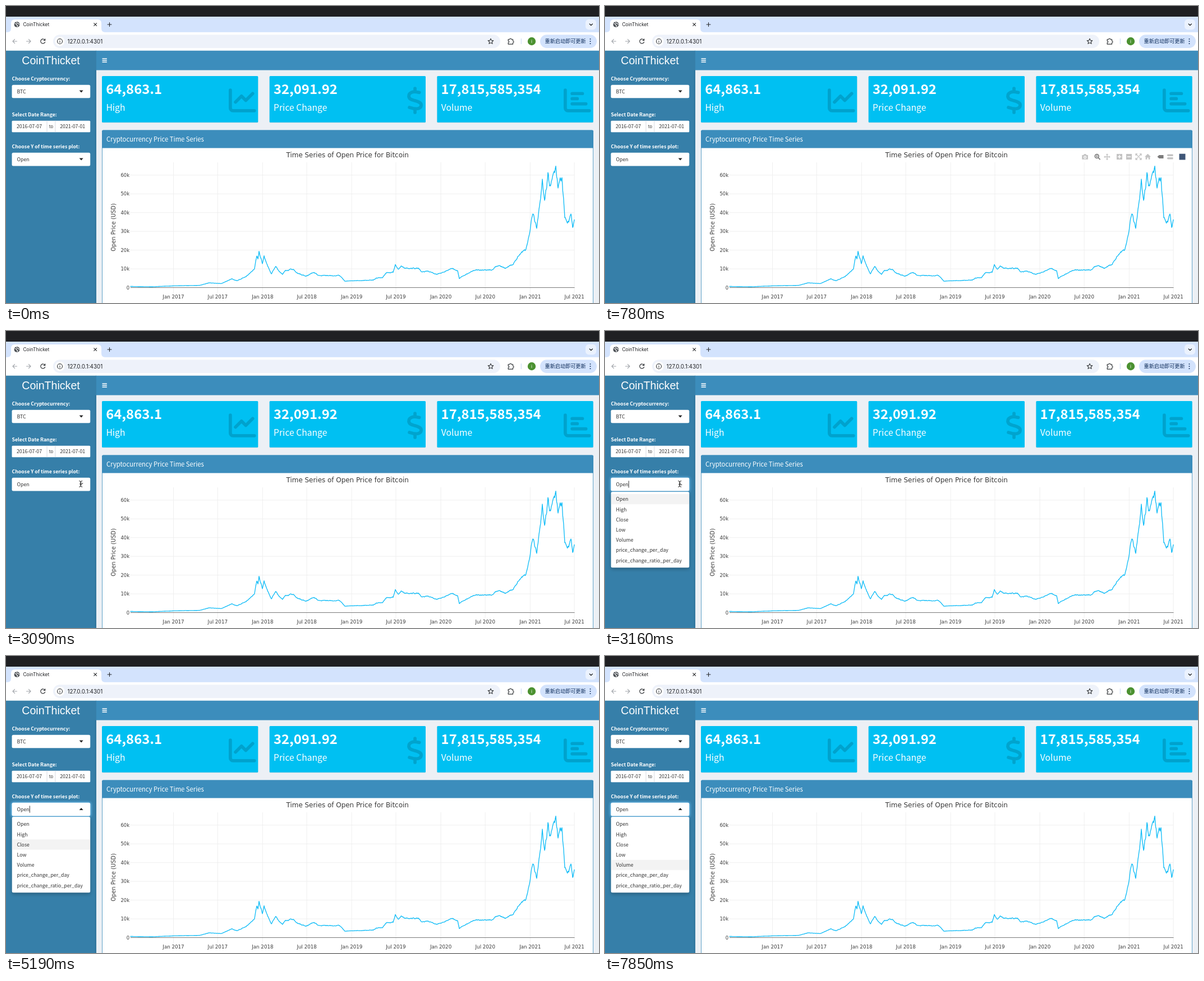
Recreate the animation shown at these times as an HTML page. Size 1057 by 530 pixels, loop 8000 ms.

```html
<!DOCTYPE html>
<html lang="en">
<head>
<meta charset="utf-8">
<title>CoinThicket</title>
<style>
html, body { margin: 0; width: 100%; height: 100%; overflow: hidden; background: #ecf0f5; }
svg { display: block; width: 1057px; height: 530px; }
text { white-space: pre; }
.page { font: 8.77px "Noto Sans CJK SC", "Noto Sans CJK", sans-serif; fill: #333; }
.chrome { font: 8.4px Inter, sans-serif; fill: #1f2023; }
.plot { font: 8.4px "DejaVu Sans", sans-serif; fill: #3a3a3a; }
.label { font-weight: 700; fill: #fff; }
.value { font-size: 23.85px; font-weight: 700; fill: #fff; }
.name { font-size: 15.67px; fill: #fff; }
.line { fill: none; stroke-linecap: round; stroke-linejoin: round; }

/* One loop is 8 s, so 1% is 80 ms. */
.anim { animation: 8s step-end infinite; }
#modebar { animation-name: modebar; }
#menu, #up { animation-name: open; }
#down { animation-name: closed; }
#glow { animation-name: glow; }
#beam { animation-name: beam; }
#caret { animation-name: caret; }
#pick { animation-name: pick; }
@keyframes modebar {
  0% { opacity: 0; } 6.25% { opacity: .1; } 7.125% { opacity: .4; } 8% { opacity: .7; }
  8.875% { opacity: .92; } 9.75% { opacity: 1; } 25.5% { opacity: .8; }
  26.375% { opacity: .4; } 27.25% { opacity: .12; } 28.125%, 100% { opacity: 0; }
}
@keyframes open { 0% { opacity: 0; } 39.5%, 100% { opacity: 1; } }
@keyframes closed { 0% { opacity: 1; } 39.5%, 100% { opacity: 0; } }
@keyframes glow { 0% { opacity: 0; } 39.5% { opacity: .8; } 40.375%, 100% { opacity: 1; } }
@keyframes beam { 0% { opacity: 0; } 38.625% { opacity: 1; } 43.875%, 100% { opacity: 0; } }
@keyframes caret {
  0% { opacity: 0; } 39.5% { opacity: 1; } 46.5% { opacity: 0; } 52.625% { opacity: 1; }
  58.75% { opacity: 0; } 64.875% { opacity: 1; } 71.875% { opacity: 0; } 78% { opacity: 1; }
  85% { opacity: 0; } 92% { opacity: 1; } 98.125%, 100% { opacity: 0; }
}
@keyframes pick {
  0% { transform: none; } 44.75% { transform: translateY(18.2px); }
  64.875% { transform: translateY(36.4px); } 79.75% { transform: translateY(54.6px); }
  96.375%, 100% { transform: translateY(72.8px); }
}
</style>
</head>
<body>
<svg viewBox="0 0 1057 530">
  <defs>
    <filter id="soft" x="-20%" y="-20%" width="140%" height="150%"><feGaussianBlur stdDeviation="3"/></filter>
    <filter id="halo" x="-20%" y="-60%" width="140%" height="220%"><feGaussianBlur stdDeviation="2"/></filter>
    <linearGradient id="edge"><stop stop-color="#000" stop-opacity="0"/><stop offset="1" stop-color="#000" stop-opacity=".07"/></linearGradient>
    <path id="axes" d="M32 64V400a48 48 0 0 0 48 48H480"/>
  </defs>

  <!-- browser -->
  <g class="chrome">
    <rect width="1057" height="19.5"/>
    <rect y="19" width="1057" height="28" fill="#d3e3fd"/>
    <path d="M2 47q7 0 7-7V31q0-7 7-7H163q7 0 7 7V40q0 7 7 7z" fill="#fff"/>
    <rect y="46.8" width="1057" height="33.2" fill="#fff"/>
    <circle cx="19.5" cy="33" r="5" fill="#4d5156"/>
    <path d="M16 31.3l2.8 1.2.6 2.2 1.8.3-1.4 2M18.8 28.8l.6 1.8 2.2.2 1.8 2" class="line" stroke="#fff" stroke-width="1.1"/>
    <text x="30.5" y="36">CoinThicket</text>
    <path d="M156.8 30.6l4.8 4.8m0-4.8l-4.8 4.8M181 33h7m-3.5-3.5v7" class="line" stroke="#26282b" stroke-width="1.1"/>
    <rect x="1033" y="23.7" width="19" height="18.6" rx="6" fill="#ebf2fe"/>
    <path d="M1040.2 32l2.6 2.5 2.6-2.5" class="line" stroke="#1f2023" stroke-width="1.2"/>
    <g class="line" stroke="#a0a4a9" stroke-width="1.1">
      <path d="M19.5 63h-7.5m3.6-3.6L12 63l3.6 3.6M36.5 63H44m-3.6-3.6L44 63l-3.6 3.6"/>
    </g>
    <path d="M69.4 61.2a4 4 0 1 0 .2 3M69.7 58.8v2.7H67" class="line" stroke="#303336" stroke-width="1.2"/>
    <rect x="84" y="51.3" width="797" height="23.6" rx="11.8" fill="#eef2fa"/>
    <circle cx="96" cy="63" r="8.6" fill="#fff"/>
    <circle cx="96" cy="63" r="4.5" class="line" stroke="#303336" stroke-width="1.1"/>
    <path d="M96 62.7v2.4m0-4.5v.1" class="line" stroke="#303336" stroke-width="1.1"/>
    <text x="109.5" y="66.5" font-size="9.8">127.0.0.1:4301</text>
    <path d="M864 58.2l1.4 3.2 3.5.3-2.7 2.3.8 3.4-3-1.8-3 1.8.8-3.4-2.7-2.3 3.5-.3z" class="line" stroke="#34373a" stroke-width="1.1"/>
    <path d="M895.2 59.5h2.6a1.5 1.5 0 0 1 3 0h2.7v3a1.5 1.5 0 0 1 0 3v2.6h-8.3v-2.7a1.5 1.5 0 0 0 0-3z" class="line" stroke="#34373a" stroke-width="1.2"/>
    <path d="M918.3 58v10" stroke="#c5d6f3" stroke-width="1"/>
    <circle cx="937" cy="63" r="7.2" fill="#4b9130"/>
    <text x="937" y="65.8" font-size="8" text-anchor="middle" style="fill:#fff">i</text>
    <rect x="952" y="51.3" width="101" height="23.6" rx="11.8" fill="#d3e3fd"/>
    <text x="960.5" y="66.4" style="font:500 9.13px 'Noto Sans CJK SC',sans-serif;fill:#0c2b58">重新启动即可更新</text>
    <path d="M1041.5 58.9v.01m0 4.1v.01m0 4.1v.01" class="line" stroke="#0c2b58" stroke-width="1.9"/>
  </g>

  <!-- dashboard frame -->
  <g class="page">
    <rect y="79.7" width="1057" height="451" fill="#ecf0f5"/>
    <rect x="160" y="79.7" width="897" height="34.8" fill="#3c8dbc"/>
    <rect y="79.7" width="161" height="451" fill="#367fa9"/>
    <rect x="156" y="114.5" width="5" height="416" fill="url(#edge)"/>
    <text x="80" y="104" text-anchor="middle" style="font:19.6px 'Liberation Sans',Arial,sans-serif;fill:#fff">CoinThicket</text>
    <path d="M171.5 94h8.4m-8.4 3h8.4m-8.4 3h8.4" stroke="#fff" stroke-width="1.4"/>

    <g id="cards"></g>
    <g fill="none" stroke="#000" stroke-width="60" stroke-linecap="round" stroke-linejoin="round">
      <g transform="translate(396.8 144) scale(.0957)" opacity=".15">
        <use href="#axes"/><path d="M128 288L240 176L320 256L448 128"/>
      </g>
      <g transform="translate(713.7 144) scale(.0957)" opacity=".15">
        <path d="M160 32V90M160 420V480M240 108L192 99C110 87 52 115 46 164C36 232 100 245 158 260C220 277 284 296 276 350C268 405 205 420 125 406L56 386"/>
      </g>
      <g transform="translate(993.8 144) scale(.0957)" opacity=".15">
        <use href="#axes"/><path d="M160 128H352M160 224H256M160 320H416"/>
      </g>
    </g>

    <rect x="171.5" y="222" width="875" height="320" rx="2" fill="#fff" stroke="#3c8dbc" stroke-width=".8"/>
    <path d="M171 253.5V223.5q0-2 2-2H1045q2 0 2 2V253.5z" fill="#3c8dbc"/>
    <text x="179" y="242.3" style="font-size:11.28px;fill:#fff">Cryptocurrency Price Time Series</text>
  </g>

  <!-- chart -->
  <g class="plot">
    <g id="grid" stroke="#eee" stroke-width=".9"></g>
    <path d="M222 502.5H1013.5" stroke="#6b6b6b" stroke-width=".9"/>
    <path id="curve" class="line" stroke="#13bdf7" stroke-width="1.35"/>
    <g id="ticks"></g>
    <text x="608.7" y="269.6" font-size="11.93" text-anchor="middle" style="font-size:11.93px">Time Series of Open Price for Bitcoin</text>
    <text transform="translate(194.8 395) rotate(-90)" text-anchor="middle" style="font-size:9.9px">Open Price (USD)</text>
  </g>

  <g id="modebar" class="anim" fill="#c3c3c3">
    <path fill-rule="evenodd" d="M850.3 266h2.6l1-1.7h3.4l1 1.7h2.6v7.8h-10.6zM855.6 267.3a2.6 2.6 0 1 0 .01 0zm0 1.3a1.3 1.3 0 1 1-.01 0z"/>
    <g fill="none" stroke="#7c7c7c" stroke-width="1.7">
      <circle cx="876.7" cy="268" r="3.4"/><path d="M879.3 270.7l3.3 3.4"/><path d="M874.8 268h3.8m-1.9-1.9v3.8" stroke-width="1"/>
    </g>
    <path d="M895 263.2l2.2 2.6h-1.5v2.7h2.7v-1.5l2.4 2.2-2.4 2.2v-1.5h-2.7v2.7h1.5l-2.2 2.6-2.2-2.6h1.5v-2.7h-2.7v1.5l-2.4-2.2 2.4-2.2v1.5h2.7v-2.7h-1.5z"/>
    <path fill-rule="evenodd" d="M912 264h10v10h-10zM916.2 265.8v2.4h-2.4v1.6h2.4v2.4h1.6v-2.4h2.4v-1.6h-2.4v-2.4zM929 264h10v10h-10zM930.8 268.2v1.6h6.4v-1.6z"/>
    <path d="M946 267v-3h3m4 0h3v3m0 4v3h-3m-4 0h-3v-3M947 265l8 8m0-8l-8 8" fill="none" stroke="#c3c3c3" stroke-width="1.3"/>
    <path d="M967.5 263.8l5.4 5.2h-1.5v4.8h-2.7v-3.2h-2.4v3.2h-2.7v-4.8h-1.5z"/>
    <path d="M984.5 269l3.2-3h7.8v6h-7.8z" fill="#7c7c7c"/>
    <path d="M1001.5 266.2l1.6-1.7h9.4v3.5h-9.4zM1001.5 271.8l1.6-1.7h9.4v3.5h-9.4z"/>
    <rect x="1023.5" y="263.7" width="11" height="10.8" fill="#3f5678"/>
  </g>

  <!-- sidebar controls -->
  <g class="page">
    <text class="label" x="10.5" y="133.3">Choose Cryptocurrency:</text>
    <text class="label" x="10.5" y="197.2">Select Date Range:</text>
    <text class="label" x="10.5" y="254.4">Choose Y of time series plot:</text>
    <rect x="10.5" y="140.7" width="139.7" height="23.6" rx="2.5" fill="#fff"/>
    <text x="19.5" y="155.8">BTC</text>
    <path d="M130.6 150.4h7l-3.5 4z" fill="#222"/>
    <rect x="10.5" y="204.7" width="139.7" height="20.6" rx="1.5" fill="#fff"/>
    <path d="M73 204.7v20.6M87.8 204.7v20.6" stroke="#cfd4dc" stroke-width=".8"/>
    <text x="19" y="218.2">2016-07-07</text>
    <text x="76.8" y="217.8" style="font-size:7.5px">to</text>
    <text x="96.2" y="218.2">2021-07-01</text>

    <rect id="glow" class="anim" x="9.5" y="261" width="141.7" height="25.4" rx="4" fill="#6fc3f5" filter="url(#halo)"/>
    <rect x="10.5" y="261.8" width="139.7" height="23.6" rx="2.5" fill="#fff"/>
    <text x="19.5" y="276.8">Open</text>
    <path id="caret" class="anim" d="M42.3 267.3v12.4" stroke="#222" stroke-width=".9"/>
    <path id="down" class="anim" d="M130.6 271.4h7l-3.5 4z" fill="#222"/>
    <path id="up" class="anim" d="M130.6 274.9h7l-3.5-4z" fill="#222"/>
    <g id="menu" class="anim">
      <rect x="11" y="291" width="139" height="134" fill="#000" opacity=".24" filter="url(#soft)"/>
      <rect x="10.7" y="287" width="139.5" height="135.2" rx="2.5" fill="#fff"/>
      <rect id="pick" class="anim" x="10.9" y="291" width="139.1" height="18.2" fill="#f3f3f3"/>
      <g id="items"></g>
    </g>
    <g id="beam" class="anim line">
      <path id="ibeam" d="M130.6 267.6q2.6 0 2.6 1.6v7.4q0 1.6-2.6 1.6M135.8 267.6q-2.6 0-2.6 1.6v7.4q0 1.6 2.6 1.6M131.8 273.4h2.8" stroke="#fff" stroke-width="2.2"/>
      <use href="#ibeam" style="stroke:#222"/>
      <path d="M130.6 267.6q2.6 0 2.6 1.6v7.4q0 1.6-2.6 1.6M135.8 267.6q-2.6 0-2.6 1.6v7.4q0 1.6 2.6 1.6M131.8 273.4h2.8" stroke="#222" stroke-width="1"/>
    </g>
  </g>
</svg>
<script>
const fill = (id, html) => { document.getElementById(id).innerHTML = html; };
const text = (x, y, str, attrs = "") => `<text x="${x}" y="${y}" ${attrs}>${str}</text>`;

fill("cards", [["64,863.1", "High"], ["32,091.92", "Price Change"], ["17,815,585,354", "Volume"]]
  .map(([value, name], i) => {
    const x = 171 + 298.7 * i;
    return `<rect x="${x}" y="126" width="278.3" height="82.5" rx="1.5" fill="#000" opacity=".1"/>
      <rect x="${x}" y="125" width="278.3" height="82.7" rx="1.5" fill="#00c0f2"/>` +
      text(x + 7.2, 156.7, value, 'class="value"') + text(x + 7.4, 187, name, 'class="name"');
  }).join(""));

fill("items", ["Open", "High", "Close", "Low", "Volume", "price_change_per_day", "price_change_ratio_per_day"]
  .map((name, i) => text(19.5, 303.3 + 18.2 * i, name)).join(""));

// Axes: half-year columns by calendar date, one row per 10k.
const ZERO = 502.5, ROW = 33.45;
const dateX = (year, month) =>
  298.5 + (Date.UTC(year, month) - Date.UTC(2017, 0)) / 864e5 * 0.4352;
let grid = "", ticks = "";
for (let i = 0; i < 10; i++) {
  const year = 2017 + (i >> 1), x = dateX(year, i % 2 * 6);
  grid += `<path d="M${x} 279V512"/>`;
  ticks += text(x, 521.5, `${i % 2 ? "Jul" : "Jan"} ${year}`, 'text-anchor="middle" style="font-size:8.7px"');
}
for (let i = 0; i < 7; i++) {
  const y = ZERO - ROW * i;
  if (i) grid += `<path d="M222 ${y}H1013.5"/>`;
  ticks += text(220, y + 3.1, i ? i * 10 + "k" : "0", 'text-anchor="end"');
}
fill("grid", grid);
fill("ticks", ticks);

// Price curve: a few turning points joined by a seeded, mean-reverting wobble.
const turns = [
  [222, 500.5], [260, 501], [298, 499.4], [345, 498.6], [362, 494], [384, 495.3], [402, 487], [412, 490],
  [428, 483], [443, 469], [447, 446], [449, 452], [451, 438], [457, 459], [460, 446], [466, 463],
  [473, 478], [481, 464], [486, 473], [493, 479], [498, 472], [512, 470], [520, 477], [535, 482],
  [549, 475], [557, 481], [595, 481], [604, 491], [655, 489], [660, 485.5], [671, 484.5], [678, 476],
  [690, 475], [694, 461], [699, 470], [704, 464], [712, 468], [735, 468], [741, 475], [752, 473],
  [768, 479], [783, 474], [795, 468], [805, 473], [808, 486], [820, 479], [836, 471], [865, 471],
  [876, 463], [890, 467], [904, 461], [917, 441], [926, 437], [933, 408], [939, 368], [946, 398],
  [950, 366], [956, 314], [960, 351], [966, 301], [969, 322], [975, 305], [980, 292], [984, 324],
  [991, 306], [996, 379], [1003, 385], [1007, 369], [1010, 395], [1013, 383]
];
let seed = 11, wobble = 0;
const random = () => (seed = seed * 16807 % 2147483647) / 2147483647;
let d = "M222 500.5";
for (let i = 1; i < turns.length; i++) {
  const [x0, y0] = turns[i - 1], [x1, y1] = turns[i];
  const steps = Math.ceil((x1 - x0) / 0.8);
  for (let k = 1; k <= steps; k++) {
    const t = k / steps, y = y0 + (y1 - y0) * t;
    wobble = wobble * 0.6 + (random() - 0.5) * 0.045 * (ZERO - y);
    d += `L${(x0 + (x1 - x0) * t).toFixed(1)} ${(y + wobble).toFixed(1)}`;
  }
}
document.getElementById("curve").setAttribute("d", d);
</script>
</body>
</html>
```
